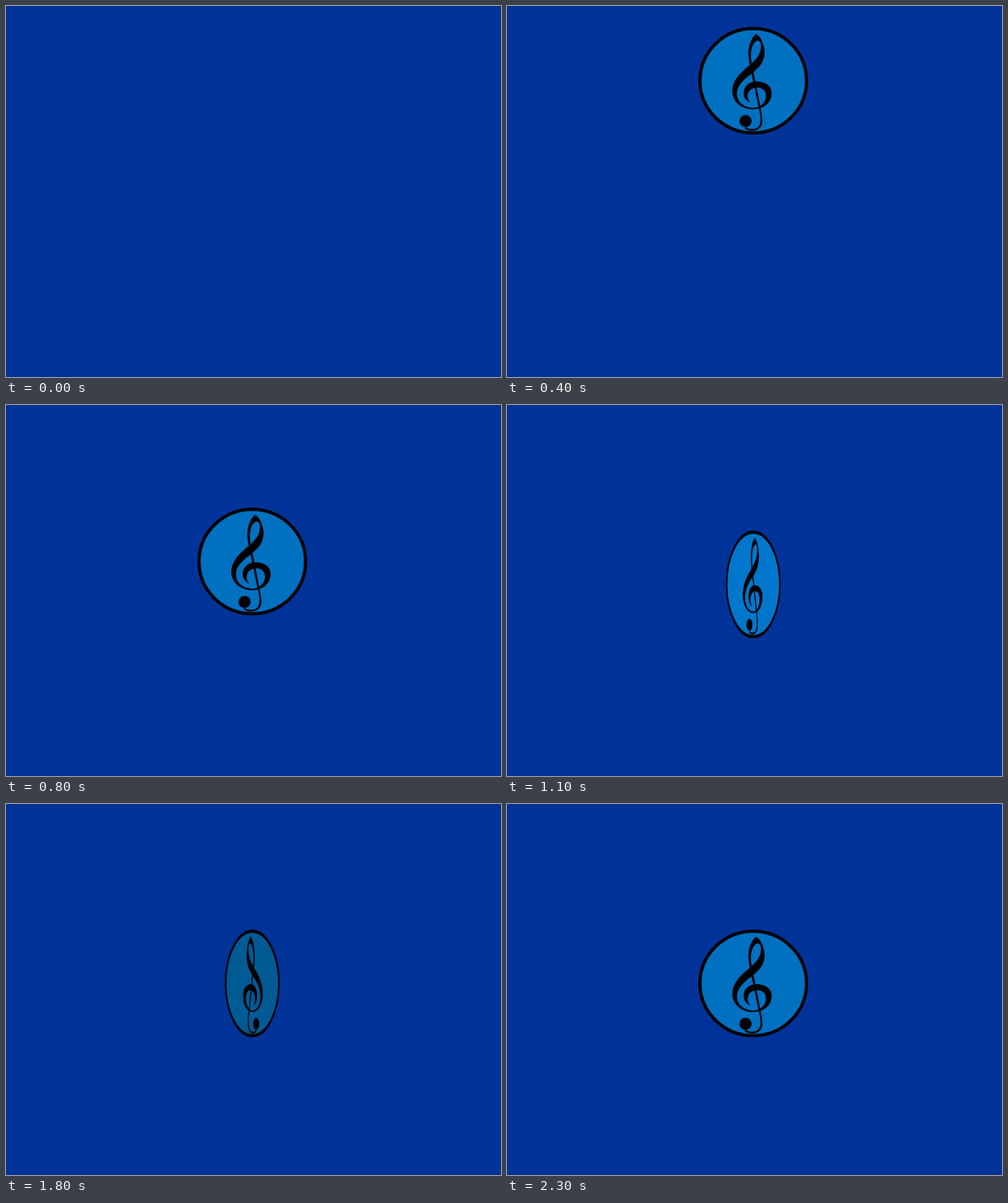
Recreate the animation shown at these times as an HTML page. Size 692 by 519 pixels, loop 2400 ms.

```html
<!DOCTYPE html>
<html lang="en">
<head>
<meta charset="utf-8">
<title>Spinning treble clef</title>
<style>
  html, body { margin: 0; width: 100%; height: 100%; overflow: hidden; background: #003399; }
  svg { display: block; }
</style>
</head>
<body>
<svg width="692" height="519" viewBox="0 0 692 519">
  <g id="coin">
    <g transform="translate(-344.3 -104.5)">
      <ellipse id="face" cx="344.3" cy="104.5" rx="74.5" ry="73" stroke-width="4.5"/>
      <g id="clef">
        <!-- stem and tail -->
        <path d="M348 39C340 46 337 58 337.5 69C338 78 341 90 343 100L352 143C354 152 355 158 354 163C353 169 349 172 343 172C338 172 335 171 334 169L332 171C335 174 340 174.5 344 174.5C352 174 357 169 357 161C357 154 355 147 354 140L346 99C343 86 341 78 341 68C341 58 345 50 350 48.5Z"/>
        <!-- upper loop and left bowl -->
        <path d="M348 39C355 42 361 57 360 67C359 80 352 86 344 93C334 101 322 109 321.5 122C321 136 334 142.5 345 142.5L344 144.5C328 144.5 315 134 315 119C315 103 328 92 340 82C349 74 355 67 355 57C355 51 353 48 350 48.5Z"/>
        <!-- inner curl -->
        <path d="M340 135C334 133 330 127 331 120C332 110 341 105 350 105.5C362 106 370 112 370 122C370 136 358 144.5 344 144.5L345 142.5C355 142 362 134 362 126C362 118 357 114 350 114C342 114 337 119 336.5 125C336 130 338 132 340 135Z"/>
        <circle cx="333.5" cy="161" r="8.5"/>
      </g>
    </g>
  </g>
</svg>
<script>
const LOOP = 2400, STEP = 100, REST = 251;
const [coin, face, clef] = ["coin", "face", "clef"].map(id => document.getElementById(id));

// Keys are [step, value...]; values between keys are linear.
const drop = [[0, -80], [1, -31], [4, 104.5], [6, 170.5], [8, 219], [9, REST]];
const spin = [[9, 0], [11, 60], [12, 85], [13, 95], [14, 120], [18, 240],
              [19, 265], [20, 275], [21, 300], [23, 360]];
// angle, face red, green, blue, ink grey
const light = [[0, 0, 112, 192, 0], [60, 0, 119, 204, 0], [85, 0, 114, 196, 0],
               [95, 18, 102, 162, 15], [150, 18, 102, 162, 15],
               [240, 0, 90, 148, 0], [275, 0, 90, 148, 0], [360, 0, 112, 192, 0]];

function at(keys, x) {
  if (x <= keys[0][0]) return keys[0].slice(1);
  const i = keys.findIndex(k => k[0] >= x);
  if (i < 0) return keys[keys.length - 1].slice(1);
  const a = keys[i - 1], b = keys[i], p = (x - a[0]) / (b[0] - a[0]);
  return a.slice(1).map((v, j) => v + (b[j + 1] - v) * p);
}

function draw(step) {
  const [y] = at(drop, step), [angle] = at(spin, step);
  const [r, g, b, grey] = at(light, angle).map(Math.round);
  const ink = `rgb(${grey},${grey},${grey})`;
  coin.setAttribute("transform",
    `translate(344.3 ${y}) scale(${Math.cos(angle * Math.PI / 180)} 1)`);
  face.setAttribute("fill", `rgb(${r},${g},${b})`);
  face.setAttribute("stroke", ink);
  clef.setAttribute("fill", ink);
}

const start = performance.now();
function tick() {
  draw(Math.floor((performance.now() - start) % LOOP / STEP));
  requestAnimationFrame(tick);
}
tick();
</script>
</body>
</html>
```
